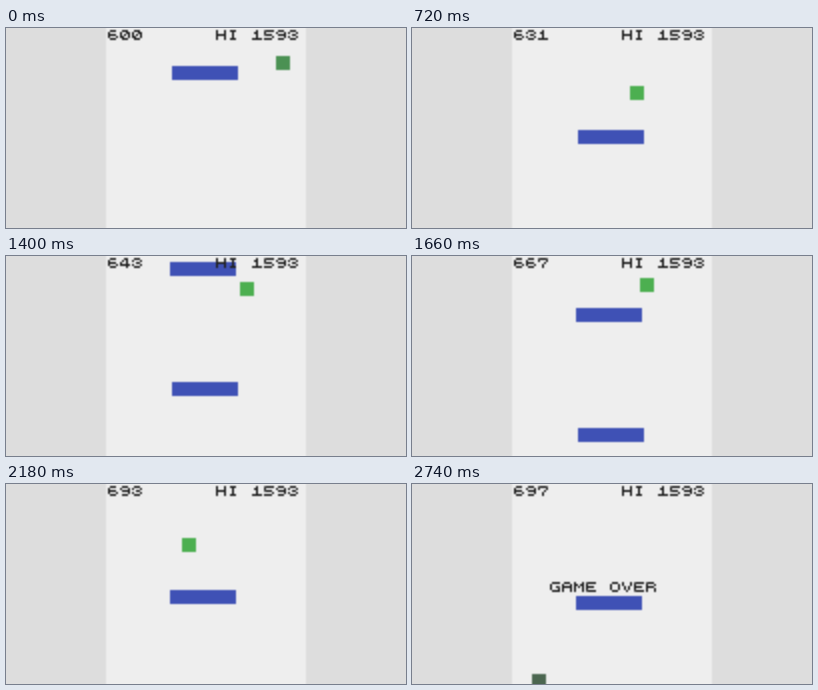
An HTML page with a canvas for the animation above (3.6 s loop, 400 by 200 pixels).

```html
<!DOCTYPE html>
<html lang="en">
<head>
<meta charset="utf-8">
<title>Jump game</title>
<style>
html, body { margin: 0; width: 100%; height: 100%; overflow: hidden; background: #ddd; }
canvas { display: block; width: 400px; height: 200px; }
</style>
</head>
<body>
<canvas id="stage" width="400" height="200" role="img" aria-label="Score, HI 1593, GAME OVER"></canvas>
<script>
const stage = document.getElementById('stage').getContext('2d');
// The game is drawn at half size, then enlarged with soft edges.
const small = document.createElement('canvas');
small.width = 200;
small.height = 100;
const ctx = small.getContext('2d');

const LOOP = 3600, TICK = 20, LAST = 137;
const GREEN = '#4caf50', DIM = '#4b9153', DARK = '#4b6650', BLUE = '#3f51b5', INK = '#212121';

// Stroked letters on a 5 x 5 grid; a "." marks a single dot.
const STROKES = {
  0: 'M1 0h2M0 1v2M4 1v2M1 4h2M3 1.M2 2.M1 3.',
  1: 'M1 1h1M2 0v4M0 4h4',
  2: 'M1 0h2M0 1.M4 1.M2 2h1M1 3.M0 4h4',
  3: 'M1 0h2M0 1.M4 1.M2 2h1M0 3.M4 3.M1 4h2',
  4: 'M2 0h1M3 0v4M1 1.M0 2.M0 3h4',
  5: 'M4 0h-4v2h3M4 3.M0 4h3',
  6: 'M1 0h2M0 1v2M0 2h3M4 3.M1 4h2',
  7: 'M0 1v-1h4v1M3 2.M2 3v1',
  8: 'M1 0h2M0 1.M4 1.M1 2h2M0 3.M4 3.M1 4h2',
  9: 'M1 0h2M0 1.M4 1v2M1 2h3M1 4h2',
  A: 'M1 0h2M0 1v3M4 1v3M0 2h4',
  E: 'M4 0h-4v4h4M0 2h3',
  G: 'M1 0h3M0 1v2M3 2h1v1M1 4h3',
  H: 'M0 0v4M4 0v4M0 2h4',
  I: 'M1 0h2M2 0v4M1 4h2',
  M: 'M0 0v4M4 0v4M1 1.M3 1.M2 2.',
  O: 'M1 0h2M0 1v2M4 1v2M1 4h2',
  R: 'M0 4v-4h3M4 1.M0 2h3M4 3v1',
  V: 'M0 0v1M4 0v1M1 2v1M3 2v1M2 4.'
};
const glyphs = {};
for (const c in STROKES) glyphs[c] = new Path2D(STROKES[c].replace(/\./g, 'h.01'));

// Player height in world space: glide, fall, rest on the bar, long jump, fall.
const REST = 12.9;
const arc = (d, y, v, g) => y + v * d + g * d * d;
function heightAt(n) {
  if (n < 20) return arc(n - 20, -5.35, -0.57, 0.0211);
  if (n < 52) return Math.min(REST, arc(n - 20, -5.35, -0.57, 0.05));
  if (n < 83) return Math.min(REST, arc(n - 83, -55.6, -1.7, 0.01747));
  return arc(n - 100, -70.05, 0, 0.05);
}

// The view drifts steadily and speeds up while the player is near the top.
const DRIFT = 0.13, PULL = 0.12, LINE = 25.27, STEPS = 20;
const scrolls = [0];
for (let n = 0; n < LAST; n++) {
  let s = scrolls[n];
  for (let i = 0; i < STEPS; i++) {
    const y = heightAt(n + (i + 0.5) / STEPS) + s;
    s += (DRIFT + PULL * Math.max(0, LINE - y)) / STEPS;
  }
  scrolls.push(s);
}

// One unit per tick: right, left, rest on the bar, right, left.
function leftAt(n) {
  if (n < 5) return 85 + n;
  if (n < 52) return 90 - (Math.min(n, 46) - 5);
  return 72 - Math.abs(n - 75);
}

function box(x, y, w, h, color) {
  ctx.fillStyle = color;
  ctx.fillRect(x, Math.floor(y), w, h);
}

function text(str, x, y) {
  ctx.strokeStyle = INK;
  ctx.lineCap = 'square';
  [...str].forEach((c, i) => {
    if (!glyphs[c]) return;
    ctx.save();
    ctx.translate(x + i * 6 + 0.5, y + 0.5);
    ctx.stroke(glyphs[c]);
    ctx.restore();
  });
}

function draw(n) {
  const scroll = scrolls[n], over = n === LAST;
  ctx.setTransform(1, 0, 0, 1, 0, 0);
  box(0, 0, 200, 100, '#ddd');
  ctx.translate(50, 0);
  box(0, 0, 100, 100, '#eee');

  for (let i = 0; i < 2; i++) box(33 - i, 19.9 - 60.2 * i + scroll, 33, 7, BLUE);
  box(leftAt(n), heightAt(n) + scroll, 7, 7, over ? DARK : n ? GREEN : DIM);

  text(String(Math.floor(600.15 + scroll)), 1, 1);
  text('HI 1593', 55, 1);
  if (over) text('GAME OVER', 19, 49);

  stage.imageSmoothingEnabled = true;
  stage.imageSmoothingQuality = 'low';
  stage.drawImage(small, 0, 0, 400, 200);
}

const start = performance.now();
function frame() {
  const t = (performance.now() - start) % LOOP;
  draw(Math.min(LAST, Math.floor(t / TICK)));
  requestAnimationFrame(frame);
}
frame();
</script>
</body>
</html>
```
